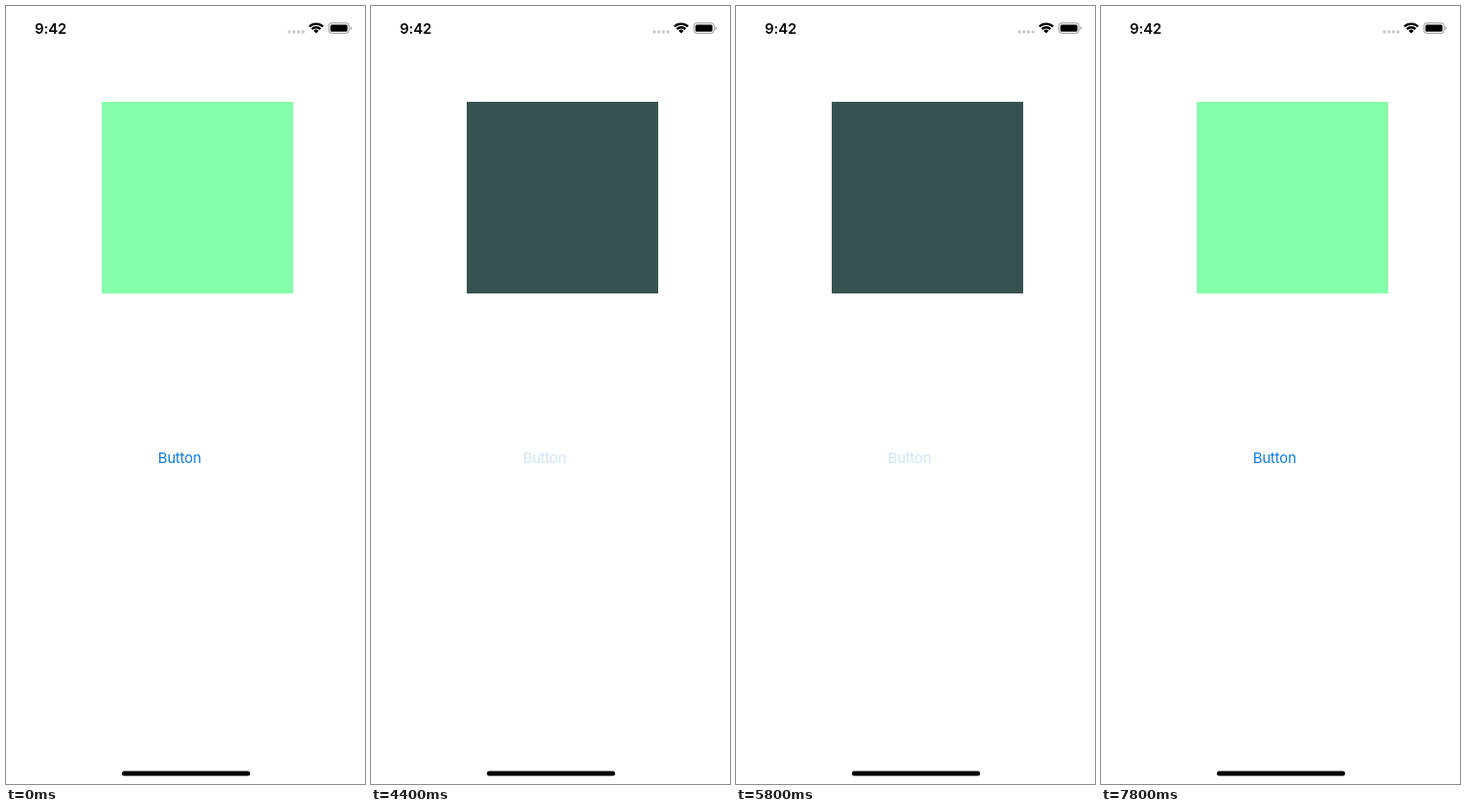
Write an HTML page that moves like this. It is 375 px wide and 812 px high and loops after 8 s.

```html
<!DOCTYPE html>
<html lang="en">
<head>
<meta charset="utf-8">
<title>Button toggles a square</title>
<style>
  html, body { margin: 0; width: 100%; height: 100%; overflow: hidden; background: #fff; }
  svg { display: block; width: 375px; height: 812px; }
  text { font: 15px Inter, Roboto, sans-serif; }
  .clock { font-weight: 600; letter-spacing: -.1px; }
  #button { fill: #0b7be0; letter-spacing: -.2px; }
</style>
</head>
<body>
<svg viewBox="0 0 375 812">
  <text class="clock" x="30" y="28.5">9:42</text>
  <g fill="#c8c8c8">
    <circle cx="296" cy="27" r="1.7"/>
    <circle cx="300.8" cy="27" r="1.7"/>
    <circle cx="305.5" cy="27" r="1.7"/>
    <circle cx="310.2" cy="27" r="1.7"/>
  </g>
  <g transform="translate(324 28.6)" fill="none" stroke="#000" stroke-width="2.3">
    <path d="M-7.1-7.1A10 10 0 0 1 7.1-7.1M-4.5-4.5A6.4 6.4 0 0 1 4.5-4.5"/>
    <path d="M0 0L-2.7-2.7A3.8 3.8 0 0 1 2.7-2.7Z" fill="#000" stroke="none"/>
  </g>
  <rect x="337.2" y="17.8" width="21" height="10.6" rx="2.8" fill="none" stroke="#000" stroke-opacity=".4"/>
  <rect x="338.8" y="19.4" width="17.8" height="7.4" rx="1.5"/>
  <path d="M359.6 21.2a2 2 0 0 1 0 3.8z" fill-opacity=".45"/>

  <rect id="square" x="100" y="100" width="200" height="200"/>
  <text id="button" x="158.8" y="476.5">Button</text>
  <rect x="121" y="798.5" width="134" height="5" rx="2.5"/>
</svg>
<script>
  const LOOP = 8000, STEP = 200, FADE = 800, PRESSED = 0.2;
  const taps = [
    { press: 3000, release: 3250, toggle: 3200 },
    { press: 4400, release: 4560, toggle: 4800 },
    { press: 5600, release: 5780, toggle: 5800 },
    { press: 6800, release: 6960, toggle: 7200 }
  ];
  const square = document.getElementById('square');
  const button = document.getElementById('button');
  const start = performance.now();

  function smooth(x) {
    const p = Math.min(1, Math.max(0, x));
    return p * p * (3 - 2 * p);
  }

  function buttonOpacity(t) {
    const tap = taps.filter(({ press }) => t >= press).pop();
    return tap ? PRESSED + (1 - PRESSED) * smooth((t - tap.release) / FADE) : 1;
  }

  function draw() {
    const elapsed = Math.max(0, performance.now() - start) % LOOP;
    const t = Math.floor(elapsed / STEP) * STEP;
    const dark = taps.filter(({ toggle }) => t >= toggle).length % 2;
    square.setAttribute('fill', dark ? '#365250' : '#86ffab');
    button.setAttribute('fill-opacity', buttonOpacity(t));
    requestAnimationFrame(draw);
  }
  draw();
</script>
</body>
</html>
```
